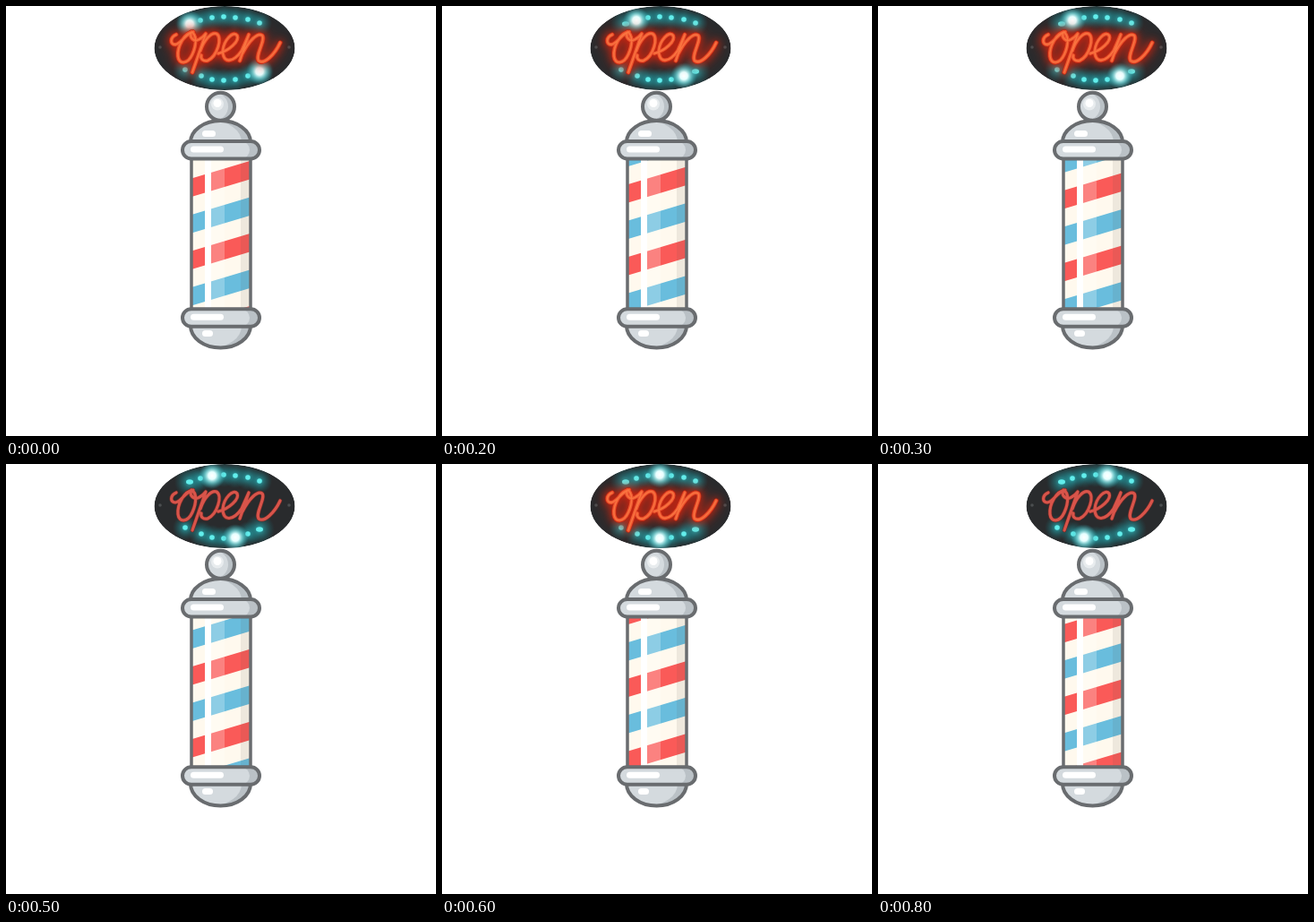
Recreate the animation shown at these times as an HTML page with a canvas. Size 480 by 480 pixels, loop 0.9 s.

```html
<!DOCTYPE html>
<html lang="en">
<head>
<meta charset="utf-8">
<title>Barber pole</title>
<style>
  html, body { margin: 0; width: 100%; height: 100%; overflow: hidden; background: #fff; }
  canvas { display: block; width: 480px; height: 480px; }
</style>
</head>
<body>
<canvas id="stage" width="480" height="480" aria-label="Open sign above a barber pole"></canvas>
<script>
const ctx = document.getElementById('stage').getContext('2d');
const LOOP = 900, STEP = 100;
const PERIOD = 81, BAND = 20.5, SLOPE = -0.3;
const OUTLINE = '#696c6f', STEEL = '#d4dade', SHADE = '#bac1c6', LIGHT = '#e8ecee';

const topDots = [[205, 20], [217, 16], [230, 13], [243, 12], [256, 13], [270, 15], [283, 19]];
const lowDots = [[200, 71], [218, 78], [230, 82], [243, 83], [256, 82], [270, 78], [283, 73]];

const lettering = new Path2D(
  'M190 32 C183 35 183 43 189 43 C196 42 200 31 209 29 ' +
  'C199 30 191 45 192 56 C193 66 203 65 208 54 C213 43 213 32 207 29 ' +
  'C204 35 210 41 216 37 Q220 35 223 31 L208 74 ' +
  'M217 50 C221 38 229 29 235 31 C242 35 236 56 225 61 C220 62 217 59 218 55 ' +
  'M237 53 C249 50 261 39 258 33 C254 27 243 38 242 50 ' +
  'C242 65 254 63 263 50 L271 32 L261 61 ' +
  'M264 53 C271 39 281 29 286 33 C290 38 278 55 282 61 C288 66 300 54 306 41');

function shape(path, fill, stroke, width) {
  if (fill) { ctx.fillStyle = fill; ctx.fill(path); }
  if (stroke) { ctx.strokeStyle = stroke; ctx.lineWidth = width; ctx.stroke(path); }
}

function oval(x, y, rx, ry, from = 0, to = 2 * Math.PI) {
  const p = new Path2D();
  p.ellipse(x, y, rx, ry, 0, from, to);
  return p;
}

function pill(x, y, w, h) {
  const p = new Path2D();
  p.roundRect(x, y, w, h, h / 2);
  return p;
}

function glow(x, y, r, stops) {
  const g = ctx.createRadialGradient(x, y, 0, x, y, r);
  stops.forEach(([at, color]) => g.addColorStop(at, color));
  ctx.fillStyle = g;
  ctx.fillRect(x - r, y - r, 2 * r, 2 * r);
}

// Metal part: the lit face is the same shape moved left over the shaded one.
function metal(path, rim, shine) {
  ctx.save();
  ctx.clip(path);
  shape(path, SHADE);
  ctx.translate(-rim, 0);
  shape(path, STEEL);
  ctx.restore();
  shape(path, null, OUTLINE, 4);
  if (shine) shape(shine, '#fff');
}

function drawStripes(shift) {
  ctx.save();
  ctx.beginPath();
  ctx.rect(207, 170, 66, 168);
  ctx.clip();
  ctx.fillStyle = '#fff9ee';
  ctx.fillRect(207, 170, 66, 168);
  for (let n = -2; n < 7; n++) {
    const y = 192.5 + shift + n * PERIOD / 2;
    ctx.fillStyle = n % 2 ? '#69bddd' : '#fa5a58';
    ctx.beginPath();
    ctx.moveTo(207, y);
    ctx.lineTo(273, y + 66 * SLOPE);
    ctx.lineTo(273, y + 66 * SLOPE + BAND);
    ctx.lineTo(207, y + BAND);
    ctx.fill();
  }
  ctx.fillStyle = 'rgba(255,255,255,.24)';
  ctx.fillRect(229, 170, 15, 168);
  ctx.fillStyle = 'rgba(90,85,75,.10)';
  ctx.fillRect(262, 170, 11, 168);
  ctx.fillStyle = '#fff';
  ctx.fillRect(222, 170, 7, 168);
  ctx.restore();
}

function drawPole(shift) {
  metal(oval(239.5, 112.3, 15.5, 15.5), 7);
  shape(oval(236, 109.5, 7, 7), LIGHT);
  shape(oval(236, 108.5, 4.5, 4.5), '#fff');
  metal(oval(239.5, 152, 33.5, 24, Math.PI, 2 * Math.PI), 10, pill(219, 139, 15, 7));
  drawStripes(shift);
  ctx.strokeStyle = OUTLINE;
  ctx.lineWidth = 3.5;
  ctx.strokeRect(207, 165, 66, 178);
  metal(oval(239.5, 357, 33.5, 24.5, 0, Math.PI), 10, pill(219, 362, 12, 7));
  for (const y of [151, 338.3]) {
    metal(pill(197, y, 86, 19.5), 11, pill(206, y + 5.5, 37, 7));
  }
}

function drawBulbs(dots, big, lit) {
  dots.forEach(([x, y], i) => {
    glow(x, y, i === big ? 17 : 14,
      [[0, 'rgba(50,205,210,.8)'], [.4, 'rgba(35,165,172,.45)'], [1, 'rgba(20,120,128,0)']]);
  });
  dots.forEach(([x, y], i) => shape(oval(x, y, i === big ? 4 : 2.8, 2.8), '#62eeec'));
  const [x, y] = dots[lit];
  glow(x, y, 15, [[0, '#fff'], [.28, '#e6ffff'], [.55, 'rgba(130,230,232,.65)'], [1, 'rgba(40,170,180,0)']]);
}

function drawLetters(on) {
  ctx.lineCap = ctx.lineJoin = 'round';
  if (on) {
    ctx.save();
    ctx.shadowColor = '#d8240f';
    for (const blur of [16, 8]) {
      ctx.shadowBlur = blur;
      shape(lettering, null, '#b92812', 5);
    }
    ctx.restore();
    shape(lettering, null, '#ee5530', 3.8);
    shape(lettering, null, '#f9743f', 1.4);
  } else {
    shape(lettering, null, '#6a2b27', 4.6);
    shape(lettering, null, '#d8544a', 3.2);
  }
}

function drawSign(lit, on) {
  const board = oval(244, 47, 78.5, 47);
  ctx.save();
  ctx.clip(board);
  shape(board, '#292b2d');
  for (const x of [172, 316]) shape(oval(x, 46, 1.8, 1.8), '#4b4e50');
  drawBulbs(topDots, 0, lit);
  drawBulbs(lowDots, 6, 6 - lit);
  drawLetters(on);
  ctx.restore();
}

function draw(time) {
  const k = Math.floor((time % LOOP) / STEP);
  const turn = Math.max(0, Math.floor((3 * k - 4) / 2));
  const lit = Math.floor(k / 2);
  ctx.fillStyle = '#fff';
  ctx.fillRect(0, 0, 480, 480);
  drawPole(turn * PERIOD / 12);
  drawSign(lit, k === 0 || lit % 2 === 1);
}

const start = performance.now();
function tick() {
  draw(performance.now() - start);
  requestAnimationFrame(tick);
}
tick();
</script>
</body>
</html>
```
